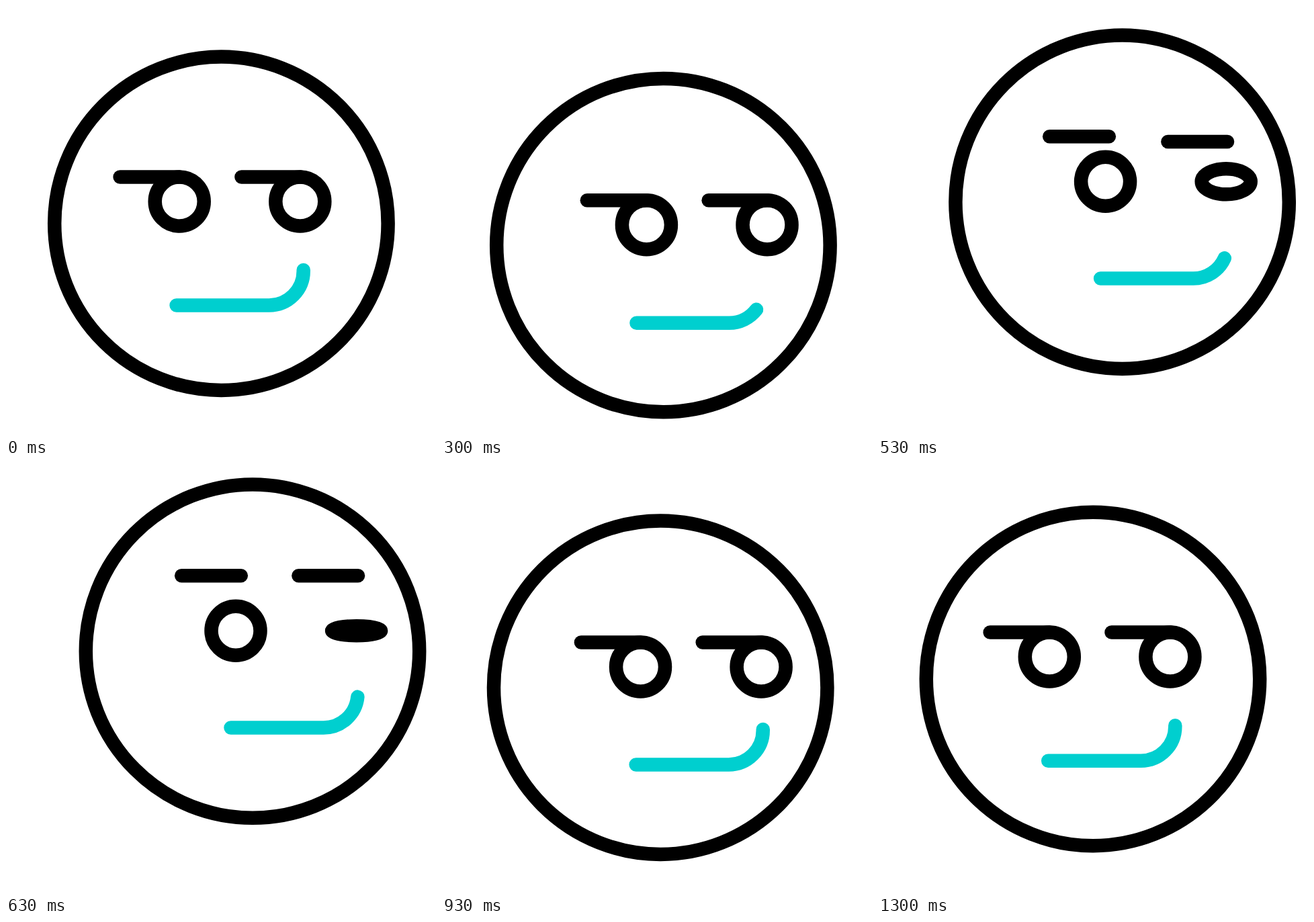
An HTML page for the animation above (1.67 s loop, 640x640 px).

```html
<!DOCTYPE html>
<html lang="en">
<head>
<meta charset="utf-8">
<title>Smirk and wink</title>
<style>
  html, body { margin: 0; width: 100%; height: 100%; overflow: hidden; background: #fff; }
  svg { display: block; width: 100%; height: 100%; }
  svg * { fill: none; stroke: #000; stroke-width: 20.5; stroke-linecap: round; }
  #mouth { stroke: #00cfcf; }
</style>
</head>
<body>
<svg viewBox="0 0 640 640">
  <g id="face">
    <circle r="248.2"/>
    <g id="eyes">
      <circle r="36.5"/>
      <ellipse id="wink" cx="179.6" rx="36.5" ry="36.5"/>
      <path id="browL" d="M-88.6 -36.5h88.6"/>
      <path id="browR" d="M92.2 -36.5h88.6"/>
    </g>
    <path id="mouth" d="M0 0H138.1a51 51 0 0 0 51 -51v-1.4"/>
  </g>
</svg>
<script>
const LOOP = 1670, FPS = 30, LAST = 40;
const MOUTH = 219.6;

// Head centre: step, x, y
const path = [
  [0, 320, 320], [1, 320.4, 323.8], [5, 321.6, 348.7], [8, 323.5, 360.3],
  [9, 325.5, 360.6], [11, 334, 349.5], [14, 349.4, 322], [17, 363.6, 291.7],
  [18, 367, 283.5], [19, 368.3, 279.2], [20, 367, 278.6], [24, 348.5, 302.8],
  [29, 325.2, 332.7], [30, 320.6, 335], [33, 320, 330.7], [40, 320, 320]
];

const $ = id => document.getElementById(id);
const [face, eyes, wink, browL, browR, mouth] =
  ['face', 'eyes', 'wink', 'browL', 'browR', 'mouth'].map($);

function ramp(n, from, to) {
  const u = Math.min(1, Math.max(0, (n - from) / (to - from)));
  return u * u * (3 - 2 * u);
}

const pulse = (n, a, b, c, d) => ramp(n, a, b) - ramp(n, c, d);
const mix = (a, b, k) => a + (b - a) * k;

function slope(i, axis) {
  const a = path[Math.max(0, i - 1)], b = path[Math.min(path.length - 1, i + 1)];
  return (b[axis] - a[axis]) / (b[0] - a[0]);
}

// Cubic Hermite through the head path
function along(n, axis) {
  let i = 0;
  while (i < path.length - 2 && n >= path[i + 1][0]) i++;
  const a = path[i], b = path[i + 1], h = b[0] - a[0], u = (n - a[0]) / h;
  const s = u * u * (3 - 2 * u);
  return mix(a[axis], b[axis], s) +
    h * u * (1 - u) * ((1 - u) * slope(i, axis) - u * slope(i + 1, axis));
}

function move(el, x, y) {
  el.setAttribute('transform', `translate(${x.toFixed(2)} ${y.toFixed(2)})`);
}

function draw(n) {
  move(face, along(n, 1), along(n, 2));

  const look = pulse(n, -0.5, 9.3, 26, 40);
  move(eyes, mix(-64.7, -25, look), mix(-33, -30.4, look));

  const liftL = pulse(n, 13, 19.5, 21, 28);
  const liftR = pulse(n, 14, 20, 22, 28);
  move(browL, 7.8 * liftL, -45.5 * liftL);
  move(browR, 1.2 * liftR, -45.5 * liftR);
  wink.setAttribute('ry', 36.5 * (1 - 0.96 * pulse(n, 15, 19, 19, 23)));

  const slide = pulse(n, 4.2, 12.5, 26, 40);
  move(mouth, mix(-66.8, -32.5, slide), mix(121.7, 113.9, slide));
  const trim = 40 * pulse(n, 2, 12.3, 12.3, 22.7);
  mouth.setAttribute('stroke-dasharray', `${MOUTH - trim} 500`);
}

const start = performance.now();

function tick() {
  const t = (performance.now() - start) % LOOP;
  draw(Math.min(LAST, 1 + Math.floor((t + 3.4) * FPS / 1000)));
  requestAnimationFrame(tick);
}
tick();
</script>
</body>
</html>
```
